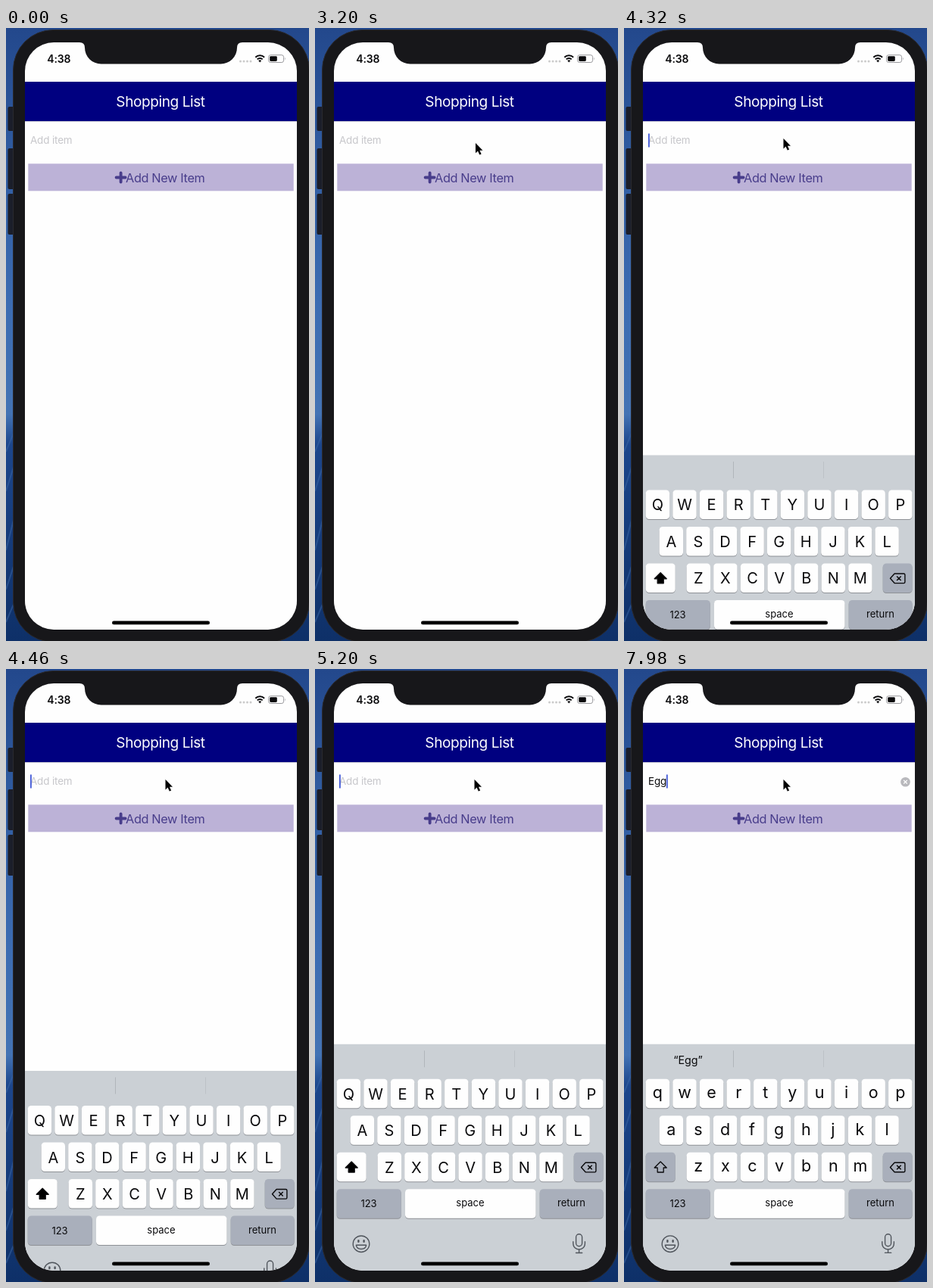
An HTML page for the animation above (8000 ms loop, 400 by 810 pixels).

```html
<!DOCTYPE html>
<html lang="en">
<head>
<meta charset="utf-8">
<title>Shopping List</title>
<style>
  html, body { margin: 0; width: 100%; height: 100%; overflow: hidden; background: #17171a; }
  svg { display: block; width: 400px; height: 810px; }
  text { font-family: Inter, "Liberation Sans", sans-serif; fill: #0a0a0c; }
  .mid { text-anchor: middle; }
  .time { font-size: 14px; font-weight: 600; letter-spacing: -.1px; }
  .title { font-size: 19px; letter-spacing: -.4px; fill: #fff; }
  .action { font-size: 16.3px; letter-spacing: -.35px; fill: #483d8b; }
  .field { font-size: 13.4px; letter-spacing: -.12px; }
  .hint { fill: #c7c7cb; }
  .cap { font-size: 20px; }
  .low { font-size: 21.5px; }
  .label { font-size: 13px; }
  .word { font-size: 14.3px; }
  .line { fill: none; stroke: #50555c; stroke-width: 1.4; stroke-linecap: round; stroke-linejoin: round; }
</style>
</head>
<body>
<svg viewBox="0 0 400 810">
  <defs>
    <linearGradient id="sky" x2="0" y2="1">
      <stop offset="0" stop-color="#23488c"/>
      <stop offset=".2" stop-color="#2f5ba0"/>
      <stop offset=".45" stop-color="#3c6cb2"/>
      <stop offset=".63" stop-color="#4373b4"/>
      <stop offset=".68" stop-color="#1c468c"/>
      <stop offset="1" stop-color="#0e3068"/>
    </linearGradient>
    <clipPath id="screen"><rect x="25" y="19" width="359" height="776" rx="38"/></clipPath>
  </defs>

  <rect width="400" height="810" fill="url(#sky)"/>
  <path d="M0 560L10 535M0 612L10 580M0 690L10 650M0 742L12 705M0 785L14 752" stroke="#3c68a6" stroke-width="2" opacity=".5"/>

  <g fill="#1b1e2a">
    <rect x="2.5" y="104" width="10" height="32" rx="2"/>
    <rect x="2.5" y="159" width="10" height="54" rx="2"/>
    <rect x="2.5" y="219" width="10" height="54" rx="2"/>
  </g>
  <rect x="9.5" y="2.5" width="391" height="809" rx="53" fill="#17171a" stroke="#2a2a2f"/>

  <g clip-path="url(#screen)">
    <rect x="25" y="19" width="359" height="776" fill="#fefefe"/>
    <rect x="25" y="123" width="359" height="1" fill="#c6c6d2"/>
    <rect x="25" y="71" width="359" height="52" fill="#000080"/>
    <text class="title mid" x="204" y="103.5">Shopping List</text>

    <text class="field" id="entry" x="32" y="153"></text>
    <rect id="caret" y="139.5" width="1.8" height="18" fill="#4259d8"/>
    <g id="clear">
      <circle cx="371.5" cy="149.2" r="6.3" fill="#b9b9bd"/>
      <path d="M369.2 146.9l4.6 4.6m0-4.6l-4.6 4.6" stroke="#fefefe" stroke-width="1.3"/>
    </g>

    <rect x="29.3" y="179.3" width="350.4" height="36" fill="#bcb2d7"/>
    <path d="M145.6 197.5h12M151.6 191.5v12" stroke="#483d8b" stroke-width="3.9" stroke-linecap="round"/>
    <text class="action" x="158" y="203.8">Add New Item</text>

    <g id="board">
      <rect x="25" width="359" height="310" fill="#cbd0d5"/>
      <path d="M144.5 8.5v22" stroke="#b0b5bb"/>
      <path d="M263.5 8.5v22" stroke="#bcc1c6"/>
      <text class="word mid" id="guess" x="84.5" y="26.5"></text>
      <g id="keys"></g>
      <g class="line">
        <circle cx="61" cy="264" r="10.8"/>
        <path d="M54.4 265.5h13.2c-.8 7-12.4 7-13.2 0z"/>
        <path d="M57.4 259.4v1.6M64.6 259.4v1.6" stroke-width="2.4"/>
        <rect x="344.6" y="251" width="8" height="16" rx="4"/>
        <path d="M340.8 261v2.5a7.8 7.8 0 0 0 15.6 0V261M348.6 271.5v4M344.5 275.7h8.2"/>
      </g>
    </g>

    <rect x="140" y="783.6" width="129" height="4.6" rx="2.3" fill="#000"/>
    <path d="M97 18v1q7 0 7 7a21.5 21.5 0 0 0 21.5 21.5h158a21.5 21.5 0 0 0 21.5-21.5q0-7 7-7v-1z" fill="#17171a"/>

    <text class="time mid" x="69.8" y="45.6">4:38</text>
    <g fill="#cbcbcb">
      <circle cx="309.5" cy="44" r="1.5"/><circle cx="314" cy="44" r="1.5"/>
      <circle cx="318.5" cy="44" r="1.5"/><circle cx="323" cy="44" r="1.5"/>
    </g>
    <g fill="none" stroke="#0a0a0c" stroke-width="2">
      <path d="M329.3 38.8a8.3 8.3 0 0 1 11.8 0M331.7 41.4a4.9 4.9 0 0 1 7 0"/>
      <path d="M333.2 43l2 2.4 2-2.4q-2-1.4-4 0z" fill="#0a0a0c" stroke="none"/>
    </g>
    <rect x="346.6" y="35.7" width="20" height="9.8" rx="2.7" fill="none" stroke="#98989c"/>
    <rect x="348.2" y="37.2" width="9.6" height="6.8" rx="1.4" fill="#0a0a0c"/>
    <path d="M368 38.8q1.4 1.8 0 3.6z" fill="#98989c"/>
  </g>

  <path id="mouse" d="M0 0V13.4L3 10.6L5.3 15.6L7.6 14.6L5.4 9.8H9.4Z" fill="#000" stroke="#f4f4f4" stroke-width="1.4" paint-order="stroke"/>
</svg>

<script>
const LOOP = 8000;
const FOCUS = 3880, RISE = 3904;
const MOUSE = { from: [375, 812], to: [210.5, 146], start: 2300, span: 1137 };
const TYPED = [[6700, 'E'], [7400, 'Eg'], [7700, 'Egg']];
const PITCH = 35.6, KEY_W = 31.4, KEY_H = 38.6;
const ROW_Y = [46, 94.5, 143, 191.5];

const $ = id => document.getElementById(id);
const show = (el, on) => el.setAttribute('visibility', on ? 'inherit' : 'hidden');

function key(x, y, w, grey) {
  const fill = grey ? '#a9afbb' : '#fefefe';
  return `<rect x="${x}" y="${y + 1}" width="${w}" height="${KEY_H}" rx="4.6" fill="#8e9196"/>
    <rect x="${x}" y="${y}" width="${w}" height="${KEY_H}" rx="4.6" fill="${fill}"/>`;
}

const label = (x, y, cls, str) => `<text class="${cls} mid" x="${x}" y="${y}">${str}</text>`;

function keyboard(upper) {
  let out = '';
  const rows = [['qwertyuiop', 28.7], ['asdfghjkl', 46.6], ['zxcvbnm', 82.6]];
  rows.forEach(([letters, left], r) => [...letters].forEach((ch, i) => {
    const x = left + i * PITCH, y = ROW_Y[r];
    out += key(x, y, KEY_W) + (upper
      ? label(x + KEY_W / 2, y + 27, 'cap', ch.toUpperCase())
      : label(x + KEY_W / 2, y + 25.4, 'low', ch));
  }));
  const y3 = ROW_Y[2], y4 = ROW_Y[3];
  out += key(28.7, y3, 39, !upper) + key(341.7, y3, 38.8, true);
  out += `<path transform="translate(48.2 ${y3 + 12.3})" d="M0 0L8 8H4V14H-4V8H-8Z"
    fill="${upper ? '#000' : 'none'}" stroke="#0a0a0c" stroke-width="1.3" stroke-linejoin="round"/>`;
  out += `<path transform="translate(361.3 ${y3 + 19.8})" d="M-9.8 0L-4.2-6.3H8Q9.6-6.3 9.6-4.7V4.7Q9.6 6.3 8 6.3H-4.2ZM-1.2-2.8L4.4 2.8M4.4-2.8L-1.2 2.8"
    fill="none" stroke="#0a0a0c" stroke-width="1.4" stroke-linejoin="round"/>`;
  out += key(28.7, y4, 85, true) + label(71, y4 + 24, 'label', '123');
  out += key(119, y4, 172.5) + label(205, y4 + 23.2, 'label', 'space');
  out += key(296.7, y4, 83.8, true) + label(338.5, y4 + 23.2, 'label', 'return');
  return out;
}

let shown = null;
function setText(str) {
  if (str === shown) return;
  shown = str;
  const entry = $('entry');
  entry.textContent = str || 'Add item';
  entry.setAttribute('class', str ? 'field' : 'field hint');
  $('guess').textContent = str ? `\u201c${str}\u201d` : '';
  $('keys').innerHTML = keyboard(!str);
  show($('clear'), str);
  $('caret').setAttribute('x', str ? 32 + entry.getComputedTextLength() - .2 : 32);
}

// Damped spring, with a small linear pull so that it comes to a full rest
function boardTop(t) {
  const s = Math.min(Math.max(0, t - RISE) / 1000, 2);
  const p = 7.13 * s - s * s;
  return 495.7 + Math.max(0, 299.3 * (1 + p) * Math.exp(-p) - s);
}

function draw(t) {
  setText(TYPED.reduce((cur, [at, str]) => t >= at ? str : cur, ''));
  show($('caret'), t >= FOCUS);
  show($('board'), t >= RISE - 10);
  $('board').setAttribute('transform', `translate(0 ${boardTop(t)})`);

  const { from, to, start, span } = MOUSE;
  const left = (1 - Math.min(1, Math.max(0, (t - start) / span))) ** 3;
  const [x, y] = to.map((v, i) => v + (from[i] - v) * left);
  show($('mouse'), t >= start);
  $('mouse').setAttribute('transform', `translate(${x} ${y})`);
}

function tick() {
  draw(performance.now() % LOOP);
  requestAnimationFrame(tick);
}
tick();
</script>
</body>
</html>
```
